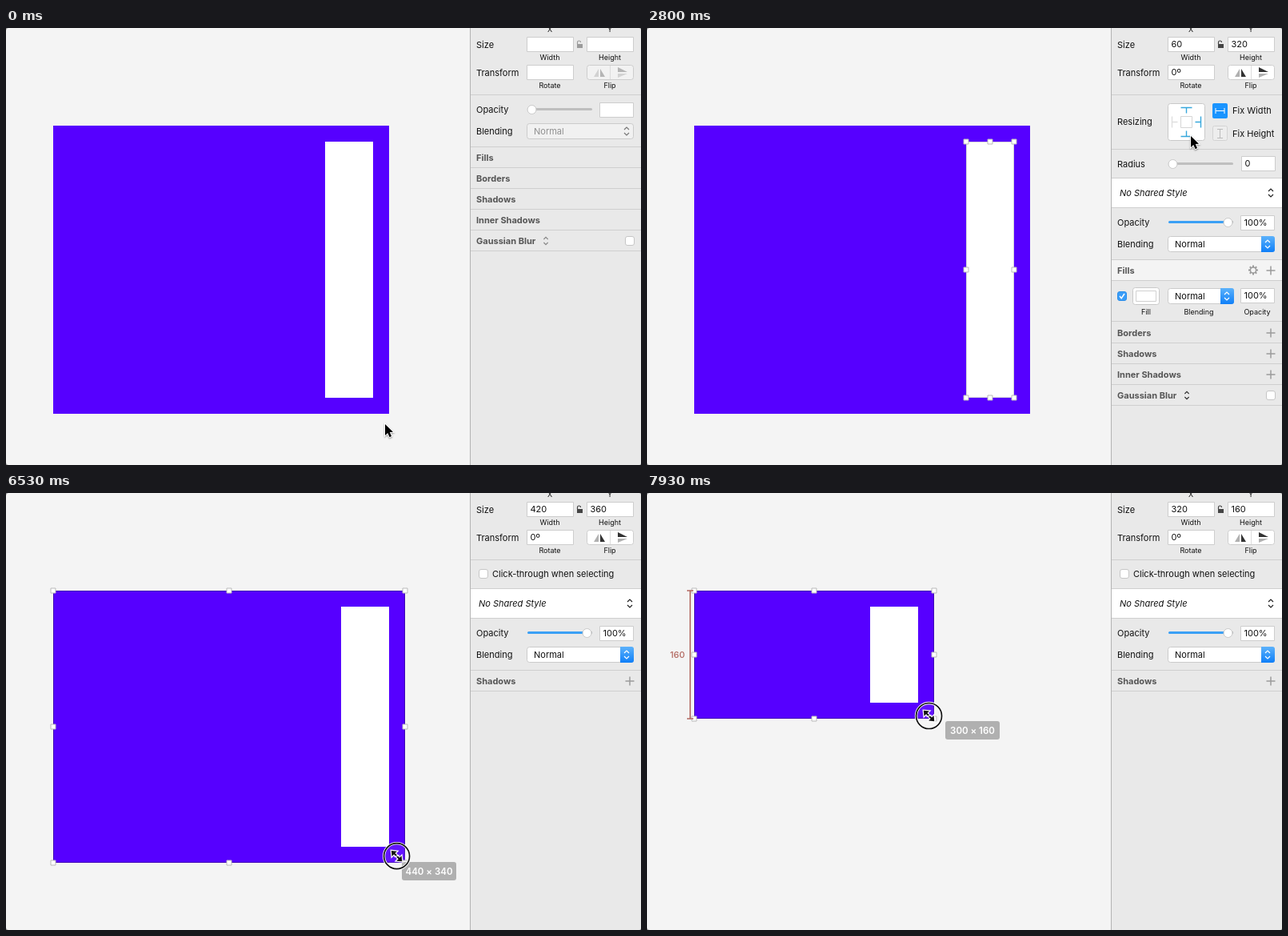
An HTML page with a canvas that plays this animation: 794 px wide and 546 px high, repeating every 8 s.

```html
<!DOCTYPE html>
<html lang="en">
<head>
<meta charset="utf-8">
<title>Resizing a group</title>
<style>
  html, body { margin: 0; width: 100%; height: 100%; overflow: hidden; background: #8d8d8d; }
  canvas { display: block; width: 794px; height: 546px; }
</style>
</head>
<body>
<canvas id="stage"></canvas>
<script>
const LOOP = 8000, FPS = 15;
const BLUE = '#1a94ff', LINE = '#cfcfcf', GREY = '#9b9b9b', PURPLE = '#5600ff';
const canvas = document.getElementById('stage');
const dpr = window.devicePixelRatio || 1;
canvas.width = 794 * dpr;
canvas.height = 546 * dpr;
const c = canvas.getContext('2d');

// Keyframes: time, x, y
const pointerKeys = [
  [70, 474, 495], [530, 436, 355], [1450, 436, 355], [2130, 672, 101], [2350, 675, 104],
  [2600, 690, 119], [2800, 680, 135], [3100, 677, 133], [3500, 718, 106], [4070, 718, 106],
  [4670, 507, 94], [4830, 507, 94], [5250, 470, 330], [5400, 470, 330], [5530, 481, 389],
  [5800, 477, 478], [6150, 477, 478], [6670, 496, 438], [6870, 534, 358], [7100, 532, 320],
  [7530, 398, 281], [7930, 344, 278]
];
const sizeKeys = [
  [6200, 420, 360], [6670, 440, 320], [6800, 460, 290], [6870, 480, 260],
  [7100, 480, 220], [7480, 360, 160], [7930, 300, 160]
];
const tagKeys = [
  [6150, 484, 486], [6670, 502, 446], [6870, 536, 389], [7100, 540, 350],
  [7530, 413, 287], [7930, 365, 286]
];

const smooth = u => u * u * (3 - 2 * u);

function sample(keys, t, ease = u => u) {
  const i = keys.findIndex(k => k[0] >= t);
  if (i === 0) return keys[0].slice(1);
  if (i < 0) return keys[keys.length - 1].slice(1);
  const [a, b] = [keys[i - 1], keys[i]];
  const u = ease((t - a[0]) / (b[0] - a[0]));
  return [a[1] + (b[1] - a[1]) * u, a[2] + (b[2] - a[2]) * u];
}

const groupSize = t => sample(sizeKeys, t).map(v => Math.round(v / 20) * 20);

function box(x, y, w, h, fill, stroke, r = 0) {
  c.beginPath();
  const o = stroke ? 0.5 : 0;
  c.roundRect(x + o, y + o, w - 2 * o, h - 2 * o, r);
  if (fill) { c.fillStyle = fill; c.fill(); }
  if (stroke) { c.strokeStyle = stroke; c.lineWidth = 1; c.stroke(); }
}

function path(points, color, width = 1, fill) {
  c.beginPath();
  points.forEach(([x, y], i) => i ? c.lineTo(x, y) : c.moveTo(x, y));
  if (fill) { c.closePath(); c.fillStyle = fill; c.fill(); }
  if (color) { c.strokeStyle = color; c.lineWidth = width; c.stroke(); }
}

function disc(x, y, r, fill, stroke, width = 1) {
  c.beginPath();
  c.arc(x, y, r, 0, 7);
  if (fill) { c.fillStyle = fill; c.fill(); }
  if (stroke) { c.strokeStyle = stroke; c.lineWidth = width; c.stroke(); }
}

// Text is placed by its vertical middle
function text(s, x, mid, { size = 11, style = '', color = '#111', align = 'left' } = {}) {
  c.font = `${style} ${size}px Inter, sans-serif`;
  c.fillStyle = color;
  c.textAlign = align;
  c.fillText(s, x, mid + size * 0.36);
}

const label = (s, mid) => text(s, 588, mid);
const caption = (s, x, mid) => text(s, x, mid, { size: 9, align: 'center' });
const rule = y => box(581, y, 213, 1, LINE);

function field(x, y, w, value = '') {
  box(x - 1, y - 1, w + 2, 19, '#fff', '#cdcdcd');
  text(value, x + 3.5, y + 8.5);
}

function chevrons(x, y, color, s = 3) {
  for (const d of [-1, 1])
    path([[x - s, y + d * 2], [x, y + d * (s + 2)], [x + s, y + d * 2]], color, 1.2);
}

function select(x, mid, w, on = true) {
  box(x - 1, mid - 10, w + 2, 20, on ? '#fff' : '#f1f1f1', '#cbcbcb', 3);
  text('Normal', x + 8, mid, { color: on ? '#111' : '#8f8f8f' });
  if (on) {
    const g = c.createLinearGradient(0, mid - 10, 0, mid + 10);
    g.addColorStop(0, '#5cb2fb');
    g.addColorStop(1, '#0f7ff8');
    box(x + w - 16, mid - 10, 17, 20, g, null, [0, 3, 3, 0]);
  }
  chevrons(x + w - 8, mid, on ? '#fff' : '#777');
}

function slider(mid, full) {
  box(652, mid - 2, 81, 3, full ? '#3ba0f5' : '#bfbfbf', null, 1.5);
  if (full) box(727, mid - 2, 6, 3, '#bfbfbf');
  disc(full ? 726.5 : 657.5, mid, 5.5, '#fff', '#c8c8c8');
}

function checkbox(x, mid, checked) {
  box(x, mid - 6, 12, 12, checked ? '#3a9df8' : '#fff', checked ? '#2b8ee9' : '#c6c6c6', 2.5);
  if (checked) path([[x + 3, mid], [x + 5.2, mid + 2.7], [x + 9, mid - 3]], '#fff', 1.5);
}

function plus(mid) {
  box(774.5, mid - 0.75, 11, 1.5, GREY);
  box(779.25, mid - 5.5, 1.5, 11, GREY);
}

function heading(s, mid, withPlus) {
  text(s, 588, mid, { style: '700', color: '#555' });
  if (withPlus) plus(mid);
  rule(mid + 12);
}

function blurHeading(mid, on) {
  heading('Gaussian Blur', mid);
  chevrons(675, mid, on ? '#333' : '#888', 2.6);
  checkbox(774, mid, false);
}

function sharedStyle(y) {
  box(581, y, 213, 37, '#fff', null);
  rule(y - 1);
  rule(y + 36);
  text('No Shared Style', 591, y + 18, { style: 'italic' });
  chevrons(780, y + 18, '#222');
}

function opacityRows(mid, on) {
  label('Opacity', mid);
  slider(mid, on);
  field(743, mid - 8, 41, on ? '100%' : '');
  label('Blending', mid + 27);
  select(652, mid + 27, 132, on);
}

function geometry(state, size) {
  const on = state !== 'none';
  caption('X', 680, 2);
  caption('Y', 755, 2);
  label('Size', 21);
  field(652, 12, 57, size ? String(size[0]) : '');
  field(727, 12, 57, size ? String(size[1]) : '');
  const lock = on ? '#444' : GREY;
  box(714, 20, 7, 5, lock);
  c.beginPath();
  c.arc(716.5, 18, 2, Math.PI, 0);
  c.moveTo(714.5, 18);
  c.lineTo(714.5, 20);
  c.strokeStyle = lock;
  c.lineWidth = 1.2;
  c.stroke();
  caption('Width', 680, 37);
  caption('Height', 755, 37);
  label('Transform', 56);
  field(652, 47, 57, on ? '0º' : '');
  box(726, 46, 59, 19, size ? '#fff' : '#f2f2f2', '#cdcdcd', 3);
  box(755, 47, 1, 17, '#dcdcdc');
  const dark = size ? '#333' : '#b5b5b5', pale = size ? '#b0b0b0' : '#d2d2d2';
  path([[741, 51], [741, 61], [735, 61]], null, 0, pale);
  path([[743, 51], [743, 61], [749, 61]], null, 0, dark);
  path([[765, 55], [777, 55], [765, 49]], null, 0, dark);
  path([[765, 57], [777, 57], [765, 62]], null, 0, pale);
  caption('Rotate', 680, 72);
  caption('Flip', 755, 72);
  rule(83);
}

function resizing() {
  label('Resizing', 117);
  box(651, 94, 47, 47, '#fff', '#c9c9c9', 3);
  box(667, 110, 15, 15, '#fff', '#d5d5d5');
  const pin = (angle, color) => {
    c.save();
    c.translate(674.5, 117.5);
    c.rotate(angle * Math.PI / 2);
    path([[-7, -18], [7, -18]], color, 1.4);
    path([[0, -18], [0, -11]], color, 1.4);
    c.restore();
  };
  [0, 1, 2].forEach(a => pin(a, '#36a7dc'));
  pin(3, '#dedede');
  box(707, 94, 19, 19, BLUE, null, 2);
  path([[711, 100], [711, 107]], '#fff');
  path([[722, 100], [722, 107]], '#fff');
  path([[711, 103.5], [722, 103.5]], '#fff');
  box(707, 122, 19, 19, '#ededed', '#d3d3d3', 2);
  path([[713, 126.5], [720, 126.5]], '#bbb');
  path([[713, 137.5], [720, 137.5]], '#bbb');
  path([[716.5, 126], [716.5, 137]], '#bbb');
  text('Fix Width', 732, 103.5);
  text('Fix Height', 732, 132);
  rule(151);
}

function gear(x, y) {
  for (let i = 0; i < 8; i++) {
    const a = i * Math.PI / 4, dx = Math.cos(a), dy = Math.sin(a);
    path([[x + dx * 3.5, y + dy * 3.5], [x + dx * 6, y + dy * 6]], GREY, 2);
  }
  disc(x, y, 3.6, null, GREY, 1.5);
}

const bodies = {
  none() {
    opacityRows(102, false);
    rule(148);
    ['Fills', 'Borders', 'Shadows', 'Inner Shadows'].forEach((s, i) => heading(s, 162 + 26 * i));
    blurHeading(266, false);
  },
  layer() {
    resizing();
    label('Radius', 170);
    slider(170, false);
    field(744, 161, 41, '0');
    sharedStyle(188);
    opacityRows(243, true);
    box(581, 290, 213, 25, '#f4f4f4');
    rule(289);
    heading('Fills', 303, true);
    gear(758, 302.5);
    checkbox(588, 335, true);
    box(607, 324, 34, 22, '#fff', '#c9c9c9', 3);
    box(611, 328, 26, 14, '#fff', '#d0d0d0');
    select(652, 335, 81);
    field(743, 326, 41, '100%');
    caption('Fill', 624, 355);
    caption('Blending', 690, 355);
    caption('Opacity', 763, 355);
    rule(366);
    ['Borders', 'Shadows', 'Inner Shadows'].forEach((s, i) => heading(s, 381 + 26 * i, true));
    blurHeading(459, true);
  },
  group() {
    checkbox(591, 101, false);
    text('Click-through when selecting', 608, 101);
    sharedStyle(120);
    opacityRows(175, true);
    rule(221);
    heading('Shadows', 235, true);
  }
};

function panel(state, size) {
  box(580, 0, 214, 546, '#e9e9e9');
  box(580, 0, 1, 546, '#b4b4b4');
  geometry(state, size);
  bodies[state]();
}

function handles(x, y, w, h) {
  for (const i of [0, 0.5, 1])
    for (const j of [0, 0.5, 1])
      if (i !== 0.5 || j !== 0.5)
        box(x + w * i - 3.5, y + h * j - 3.5, 7, 7, '#fff', '#b9b9b9');
}

function arrow(x, y) {
  const shape = [[0, 0], [0, 14], [3.3, 11], [5.6, 16.2], [8, 15.1], [5.8, 10], [10, 9.8]]
    .map(([dx, dy]) => [x + dx, y + dy]);
  c.save();
  c.shadowColor = 'rgba(0,0,0,.35)';
  c.shadowBlur = 2 * dpr;
  c.shadowOffsetY = dpr;
  path([...shape, shape[0]], '#fff', 2, '#fff');
  c.restore();
  path(shape, null, 0, '#000');
}

function resizeArrow(x, y) {
  c.save();
  c.translate(x, y);
  c.rotate(Math.PI / 4);
  const half = [[0, -1], [-4, -1], [-4, -4.5], [-9.5, 0], [-4, 4.5], [-4, 1], [0, 1]];
  const shape = [...half, ...half.map(([a, b]) => [-a, -b])];
  path([...shape, shape[0]], '#fff', 2.4, '#fff');
  path(shape, null, 0, '#111');
  path([[-1.5, 3], [1.5, -3]], '#fff', 1);
  c.restore();
}

function pressRing(x, y) {
  disc(x, y, 16, 'rgba(255,255,255,.08)', '#fff', 3.4);
  disc(x, y, 16, null, '#111', 1.7);
}

function draw(time) {
  const t = Math.floor(time * FPS / 1000 + 1e-6) * 1000 / FPS;
  const state = t < 730 ? 'none' : t < 4800 ? 'layer' : t < 5390 ? 'none' : 'group';
  const filled = state === 'layer' ? t > 860 : state === 'group' && t > 5590;
  const dragging = t >= 6060;
  const [w, h] = groupSize(t);
  const [px, py] = sample(pointerKeys, t, t < 6150 ? smooth : undefined);

  c.setTransform(dpr, 0, 0, dpr, 0, 0);
  c.clearRect(0, 0, 794, 546);
  c.save();
  c.beginPath();
  c.roundRect(0, 0, 794, 546, 3.5);
  c.clip();
  box(0, 0, 794, 546, '#f4f4f4');
  box(59, 122, w, h, PURPLE);
  const bar = [59 + w - 80, 142, 60, h - 40];
  box(...bar, '#fff');

  if (state === 'layer') {
    box(bar[0], bar[1], bar[2], bar[3], null, 'rgba(120,120,140,.3)');
    handles(...bar);
  } else if (state === 'group') {
    box(59, 122, w, h, null, 'rgba(40,0,120,.55)');
    handles(59, 122, w, h);
  } else if (px > 59 && px < 479 && py > 122 && py < 482) {
    c.strokeStyle = '#2f95ef';
    c.lineWidth = 2;
    c.strokeRect(59, 122, w, h);
  }

  if (dragging && h === 160) {
    const red = '#b2675f';
    path([[54, 122], [54, 282]], red, 1.6);
    for (const y of [122, 282]) path([[50, y], [58, y]], red, 1.6);
    text('160', 38, 202, { style: '500', color: red, align: 'center' });
  }
  if (dragging) {
    const [tx, ty] = sample(tagKeys, t).map(Math.round);
    box(tx, ty - 1, 68, 23, '#b0b0b0', null, 3);
    text(`${w} × ${h}`, tx + 34, ty + 11, { size: 11.5, style: '600', color: '#fff', align: 'center' });
  }

  const shownSize = state === 'layer' ? [60, 320] : groupSize(t - 150);
  panel(state, filled ? shownSize : null);

  const clicking = [670, 4730, 5330].some(k => t > k - 10 && t < k + 50);
  if (dragging || clicking) pressRing(px, py);
  if (t >= 5790) resizeArrow(px, py);
  else arrow(px, py);
  c.restore();
}

const start = performance.now();
function tick() {
  draw((performance.now() - start) % LOOP);
  requestAnimationFrame(tick);
}
tick();
</script>
</body>
</html>
```
